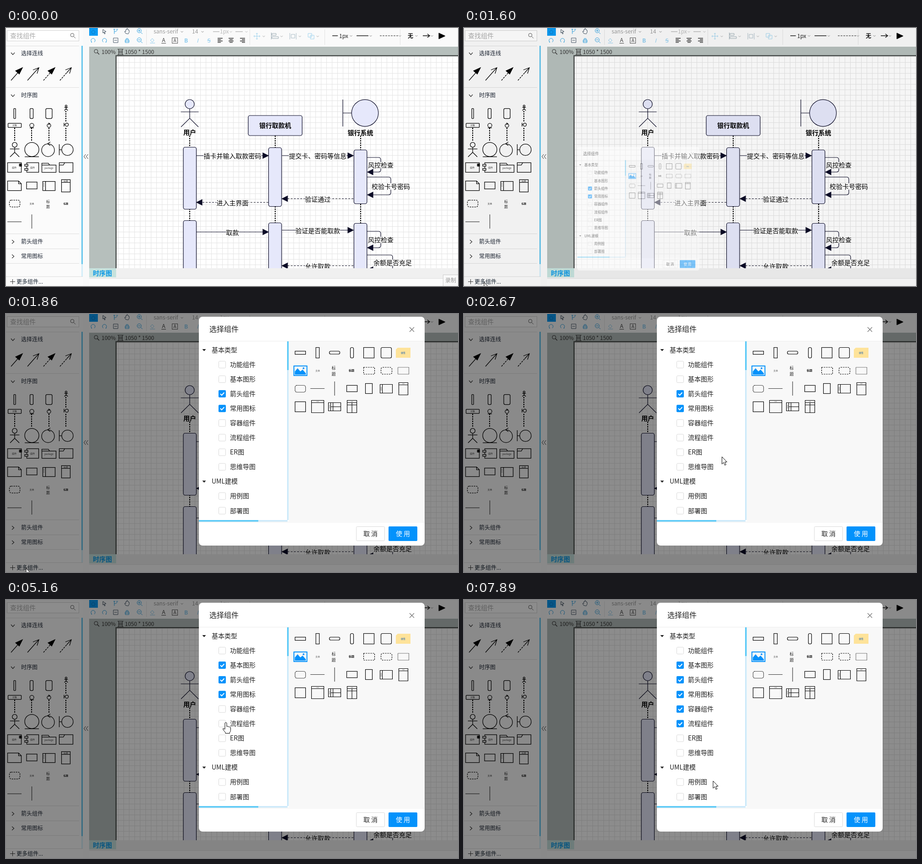
Write an HTML page that moves like this. It is 989 px wide and 566 px high and loops after 8000 ms.

```html
<!DOCTYPE html>
<html lang="zh-CN">
<head>
<meta charset="utf-8">
<style>
html, body { margin: 0; width: 100%; height: 100%; overflow: hidden; background: #fbfbfb; }
svg { display: block; }
text { font-family: "Noto Sans CJK SC", "Noto Sans CJK", "Noto Sans", sans-serif; white-space: pre; }
</style>
</head>
<body>
<svg id="stage" width="989" height="566" viewBox="0 0 989 566" fill="none" stroke="#111"></svg>
<script>
const BLUE = '#0492fb', INK = '#0b0b26', LILAC = '#e6e8fb';

// Markup helpers
const group = (attrs, ...parts) => `<g ${attrs}>${parts.flat().join('')}</g>`;
const path = (d, attrs = '') => `<path d="${d}" ${attrs}/>`;
const rect = (x, y, w, h, r = 0, attrs = '') =>
  `<rect x="${x}" y="${y}" width="${w}" height="${h}" rx="${r}" ${attrs}/>`;
const fillRect = (x, y, w, h, color, r = 0) => rect(x, y, w, h, r, `fill="${color}" stroke="none"`);
const circle = (x, y, r, attrs = '') => `<circle cx="${x}" cy="${y}" r="${r}" ${attrs}/>`;
const text = (x, y, s, size = 14, color = '#222', attrs = '') =>
  `<text x="${x}" y="${y}" font-size="${size}" fill="${color}" stroke="none" ${attrs}>${s}</text>`;
const label = (x, y, s, size, color, attrs = '') =>
  text(x, y, s, size, color, `text-anchor="middle" ${attrs}`);
const bold = 'font-weight="700"';
const dots = (x, y1, y2) => path(`M${x} ${y1}V${y2}`, 'stroke="#000" stroke-width="2" stroke-dasharray="3 2"');
const caret = (x, y, color = '#888') => path(`M${x - 2.5} ${y - 1}l2.5 2.5 2.5-2.5`, `stroke="${color}"`);
const chevron = (x, y, turn) => path('M-4-2L0 2.5 4-2', `transform="translate(${x} ${y}) rotate(${turn})" stroke="#333" stroke-width="1.2"`);
const actor = (x, y, s, fill = 'none') => circle(x, y + 10 * s, 10 * s, `fill="${fill}"`) +
  path(`M${x} ${y + 20 * s}v${21 * s}M${x - 19.5 * s} ${y + 27 * s}h${39 * s}M${x - 19 * s} ${y + 60 * s}L${x} ${y + 41 * s}l${19 * s} ${19 * s}`);

function toolbar() {
  const zoom = (y, plus) => circle(291.5, y, 4.5) + path(`M295 ${y + 3.5}l3.5 3.5M289 ${y}h5` + (plus ? `M291.5 ${y - 2.5}v5` : ''));
  const aligned = (x, a, b) => path(`M${x} 22.5h11M${x + a} 25.5h7M${x} 28.5h11M${x + b} 31.5h7`, 'stroke="#333" stroke-width="1.3"');
  return [
    fillRect(168, 0, 821, 41, '#fafafa'),
    path('M181.5 41V0M307.5 3V37M533.5 3V37M697.5 3V37M862.5 3V37', 'stroke="#e2e2e2"'),
    fillRect(181, 0, 20, 17, '#0b9bf3'),
    path('M187 8l4-3.5 4 3.5-1.5 4.5h-5z', 'stroke="#0878c4"'),
    path('M212 3l7 5-3.5.5 1.5 4-1.5.5-1.5-4-2 2z', 'stroke="#345"'),
    group('stroke="#2a9fe0"',
      path('M237 2v11M237 8q6 0 6-4M235 3h4M241 3h4'),
      path('M188 31a4.5 4.5 0 1 1 5 0M186 30l2 2M213 31a4.5 4.5 0 1 1 5 0M220 30l-2 2'),
      path('M261 26h8v6h-8zM263 26v-3h4v3M260 29h10'),
      zoom(6, true), zoom(26, false)),
    path('M262 12l-2.5-4q0-2 2.5 0V4q1-2 2 0V2q1.5-2 2 0v1q1.5-1 2 1v1q1.5-1 1.5 1v3l-2 4z', 'stroke="#456"'),
    path('M235 22h10v10h-10zM237 27h6', 'stroke="#456"'),
    text(323, 12, 'sans-serif', 12, '#999'), caret(385, 8),
    text(407, 12, '14', 12, '#999'), caret(430, 8),
    path('M453 8h14M502 8h16', 'stroke="#bbb" stroke-width="1.5"'),
    text(468, 12, '1px', 12, '#bbb'), caret(492, 8, '#bbb'), caret(526, 8, '#bbb'),
    path('M316 27l4-4 4 4-4 4zM315 33h11', 'stroke="#8ccbee"'),
    label(345, 31, 'A', 12, '#444'), path('M340 33.5h10', 'stroke="#444"'),
    rect(363.5, 21.5, 12, 12, 0, 'stroke="#555"'), label(369.5, 31, 'A', 10, '#444'),
    label(394, 32, 'B', 12, '#8ccbee', bold), label(419, 32, 'I', 12, '#8ccbee', 'font-style="italic"'),
    label(444, 32, 'S', 12, '#8ccbee', 'text-decoration="line-through"'),
    aligned(463, 0, 0), aligned(487, 2, 2), aligned(512, 4, 4),
    group('stroke="#9fd3ee"',
      path('M549 11v14M542 18h14M547 13l2-2 2 2M547 23l2 2 2-2M544 16l-2 2 2 2M554 16l2 2-2 2'),
      path('M661 12h8v8h-8zM666 16h8v8h-8z')),
    path('M580.5 10v15M582 12h9v4h-9zM582 19h14v4h-14z', 'stroke="#9aaab2"'),
    path('M621 11v14M635 11v14M624 14h8v8h-8z', 'stroke="#a9bcc6"'),
    [564, 603, 643, 682].map(x => caret(x, 18, '#aaa')),
    path('M714 17h12M767 17h26', 'stroke="#222" stroke-width="1.3"'),
    text(729, 22, '1px', 12, '#222'), caret(755, 17), caret(798, 17),
    path('M818 17h40', 'stroke="#222" stroke-dasharray="4 2"'), caret(862, 17),
    text(879, 22, '无', 12, '#111', bold), caret(898, 17),
    path('M912 17h14M922 13l5 4-5 4', 'stroke-width="1.5"'), caret(932, 17),
    path('M947 11l14 6.5-14 6.5z', 'fill="#000"')
  ].flat().join('');
}

function sidebar() {
  const arrow = (x, open, dash) => path(`M${x} 115l15-17`, dash ? 'stroke-dasharray="4 2"' : '') +
    (open ? path(`M${x + 15} 98l10-11M${x + 12} 92l13-5-4 13`) : path(`M${x + 25} 87l-15 7 8 7z`, 'fill="#000"'));
  const tiny = (x, y, s) => label(x, y, s, 5, '#333');
  const title = (y, s, turn) => chevron(15, y - 4, turn) + text(33, y, s, 12, '#1d2533');
  return [
    fillRect(0, 0, 168, 566, '#fbfbfb'),
    rect(2.5, 5.5, 157, 23, 0, 'stroke="#d2d2d2" fill="#fff"'), text(9, 22, '查找组件', 14, '#aaa'),
    circle(145, 15.5, 3.8, 'stroke="#555"'), path('M148 18.5l4 4', 'stroke="#555"'),
    path('M0 39.5H160M0 130.5H160M0 451.5H160M0 484.5H160M0 516.5H160M0 545.5H168', 'stroke="#dedede"'),
    fillRect(165, 39, 3, 506, '#d3edf9'), fillRect(165, 39, 3, 479, '#67c6ec'),
    title(60, '选择连线', 0), title(152, '时序图', 0), title(473, '箭头组件', -90), title(505, '常用图标', -90),
    group('stroke="#000" stroke-width="1.25"',
      arrow(11), arrow(47, true), arrow(82, false, true), arrow(118, true, true),
      rect(17, 176.5, 4, 22, 1), rect(52.5, 176.5, 7, 22, 2), rect(87, 176.5, 14, 22, 3),
      actor(131.5, 169, .2), dots(131, 182, 207),
      rect(4.5, 209, 29, 9, 1), tiny(19, 215, '对象'),
      circle(56.5, 213.5, 4.5), path('M52 219h9'), circle(94, 214, 4), path('M93 208l3 2-3 2'),
      circle(133, 212, 3.5), path('M127 208v8M127 212h3'),
      [19, 56, 94, 131].map(x => dots(x, 219, 247)),
      actor(19, 251, .53), circle(56.5, 266.5, 15.5), path('M41 282.5h31'),
      circle(92, 268, 14), path('M97 250l-6 4 6 4'),
      path('M116.5 255v24M117 267h5'), circle(134.5, 267, 12.5),
      rect(3.5, 295.5, 30, 21), tiny(18, 308, '组件'), path('M30 298h4v5h-4zM28 299h3M28 302h3', 'fill="#000"'),
      rect(45.5, 295.5, 26, 21), path('M41 299h7v4h-7zM41 308h7v4h-7z', 'fill="#fff"'), tiny(58, 308, '组件'),
      path('M78.5 300.5v-4h14l3 4h14v16h-31zM78.5 300.5h17'), tiny(94, 309, 'package'),
      rect(116.5, 295.5, 30, 21), path('M116.5 300.5h9l3-5'),
      path('M3.5 335.5h24l6 6v15h-30zM27.5 335.5v6h6'), rect(45, 338, 23, 15),
      path('M80.5 336.5h27v20h-27zM86.5 336.5v20'), path('M83 340v9', 'stroke="#777" stroke-dasharray="2 1"'),
      path('M121.5 332.5h19v27h-19zM121.5 338.5h19'), tiny(131, 337.5, '标题'),
      rect(7.5, 377.5, 23, 15, 4, 'stroke-dasharray="3 2"'), tiny(56.5, 387, '文本'),
      label(92, 384, '标', 8), label(92, 395, '题', 8), label(131, 387, '标题', 5, '#000', bold),
      path('M3 425h31M56.5 409v31', 'stroke="#444"')),
    path('M14.5 551v11M9 556.5h11', 'stroke="#333"'), text(23, 561, '更多组件...', 12, '#14202e', 'font-weight="500"'),
    fillRect(168, 0, 14, 566, '#f9f9f9'), path('M174.5 277l-4 5 4 5M179.5 277l-4 5 4 5', 'stroke="#333"')
  ].flat().join('');
}

function diagram() {
  const bar = (x, y, h) => rect(x, y + .5, 28.5, h, 4, `fill="${LILAC}"`);
  const head = (x, y, dir) => path(`M${x} ${y}l${-12 * dir}-6v12z`, `fill="${INK}"`);
  const caption = (cx, y, s) => fillRect(cx - s.length * 7, y - 7, s.length * 14, 14, '#fff') + label(cx, y + 5, s, 14, '#000');
  const message = (x1, x2, y, s) => {
    const dir = Math.sign(x2 - x1);
    return path(`M${x1} ${y}H${x2 - dir * 12}`, dir < 0 ? 'stroke-dasharray="4 3"' : '') +
      head(x2, y, dir) + caption((x1 + x2) / 2, y + 1, s);
  };
  const selfCall = (y, right, h, cx, s) =>
    path(`M790 ${y}H${right - 5}q5 0 5 5v${h - 10}q0 5-5 5H803`) + head(791, y + h, -1) + caption(cx, y + h / 2 + 1, s);
  return [
    `<defs><pattern id="grid" x="245" y="63" width="12" height="12" patternUnits="userSpaceOnUse">${path('M.5 0V12M0 .5H12', 'stroke="#e4e4e4"')}</pattern>
    <clipPath id="view"><path d="M182 41H989V527H182z"/></clipPath></defs>`,
    fillRect(182, 41, 807, 486, '#b6bfbc'),
    circle(197, 51, 4, 'stroke="#333"'), path('M200 54l4 4', 'stroke="#333" stroke-width="1.5"'),
    text(209, 57, '100%', 12, '#333'),
    path('M244 46.5h13M244 58.5h13M246.5 46v13M254.5 46v13M247 50h7M247 52.5h7M247 55h7', 'stroke="#333"'),
    text(260, 57, '1050 * 1500', 12, '#333'),
    group('clip-path="url(#view)"',
      fillRect(239, 59, 750, 470, '#8d9492'), fillRect(240, 60, 750, 470, '#484c4b'),
      fillRect(242, 62, 750, 470, '#fff'), fillRect(242, 62, 750, 470, 'url(#grid)'),
      group(`stroke="${INK}" stroke-width="1.2"`,
        dots(402, 236, 430), dots(589, 236, 430), dots(776, 236, 430),
        actor(402, 157, 1, LILAC), label(402, 234, '用户', 14, '#000', bold),
        rect(530, 192, 118, 44, 4, `fill="${LILAC}"`), label(589, 219, '银行取款机', 14, '#000', bold),
        path('M737 157v59M737 186.5h19'), circle(785.5, 186.5, 29.3, `fill="${LILAC}"`),
        label(775.5, 235, '银行系统', 14, '#000', bold),
        bar(388, 261, 136), bar(388, 422, 140), bar(574.5, 262, 129), bar(574.5, 427, 140), bar(761.3, 267, 118), bar(761.3, 428, 140),
        message(417, 574, 280, '插卡并输入取款密码'), message(604, 760, 280, '提交卡、密码等信息'),
        selfCall(284, 820, 32, 820, '风控检查'), selfCall(327, 842, 39, 842, '校验卡号密码'),
        message(760, 604, 374.5, '验证通过'), message(574, 417, 382.5, '进入主界面'),
        message(417, 574, 447.5, '取款'), message(604, 760, 443.5, '验证是否能取款'),
        selfCall(446, 820, 36, 820, '风控检查'), selfCall(498, 846, 32, 846, '余额是否充足'),
        message(760, 604, 521.5, '允许取款'))),
    fillRect(182, 527, 807, 22, '#f0f0f0'), fillRect(182, 527, 59, 20, '#c6e2dd'),
    text(190, 543, '时序图', 14, '#0a98e6', bold),
    path('M181 549.5H989', 'stroke="#e0e0e0"')
  ].flat().join('');
}

const TREE = ['功能组件', '基本图形', '箭头组件', '常用图标', '容器组件', '流程组件', 'ER图', '思维导图', '', '用例图', '部署图'];
const rowY = i => 111 + i * 32.05;

function dialog() {
  const folder = (y, s) => path(`M429.5 ${y - 2}h8l-4 4.5z`, 'fill="#222" stroke="none"') + text(450, y + 5, s);
  const dashed = (x, r, dash) => rect(x, 117, 24, 15, r, `stroke-dasharray="${dash}"`);
  return [
    fillRect(422, 6, 494, 502, '#fff', 8), fillRect(619, 60, 297, 395, '#f8f8f8'),
    path('M422 59.5H916M422 456.5H916', 'stroke="#ececec"'),
    text(445, 39, '选择组件', 16), path('M883 29l10 10M893 29l-10 10', 'stroke="#777" stroke-width="1.3"'),
    fillRect(615, 60, 3.5, 392, '#cdeafa'), fillRect(615, 60, 3.5, 63, '#5fcbf7'),
    fillRect(422, 452, 194, 3.5, '#cdeafa'), fillRect(422, 452, 130, 3.5, '#5fcbf7'),
    folder(79, '基本类型'), folder(rowY(8), 'UML建模'),
    TREE.map((s, i) => text(490, rowY(i) + 5, s)),
    '<g id="boxes"></g>',
    group('stroke="#000" stroke-width="1.15"',
      rect(632.5, 81.5, 23, 7), rect(678, 73.5, 7.5, 23), rect(707.5, 81.5, 23, 6.5, 3), rect(753.5, 73.5, 7, 23, 3),
      rect(782.5, 73.5, 23, 23), rect(820.5, 73.5, 23, 23, 3),
      path('M853 78l4-4h28v22h-32z', 'fill="#fee39a" stroke="none"'), label(869, 87, '便签', 5, '#2468b0'),
      rect(630, 114, 28.5, 21, 0, `stroke="${BLUE}" stroke-width="2"`),
      path('M632 133v-7l6-7 6 7 5-4 7 8v3z', `fill="${BLUE}" stroke="none"`), circle(651, 119, 2, `fill="${BLUE}" stroke="none"`),
      label(682, 126, '文本', 5, '#555'), label(717, 122, '标', 9), label(717, 135, '题', 9), label(756, 126, '标题', 6, '#111', bold),
      dashed(782.5, 0, '3 2'), dashed(820.5, 4, '3 2'), dashed(857.5, 0, '1 1'),
      rect(632.5, 156.5, 23, 15, 4, 'stroke-dasharray="2 1"'),
      path('M666 163.5h31M719 148v31', 'stroke="#333"'),
      rect(745.5, 156.5, 23, 14), rect(786.5, 152.5, 15, 22),
      path('M818.5 154.5h27v19h-27zM823.5 154.5v19M859.5 150.5h20v27h-20zM859.5 155.5h20'),
      rect(632.5, 192.5, 23, 22),
      path('M668.5 189.5h27v27h-27zM668.5 194.5h27M705.5 194.5h27v18h-27zM710.5 194.5v18M715.5 194.5v18M710.5 203.5h22M746.5 189.5h21v27h-21zM746.5 194.5h21M746.5 199.5h21M757 194.5v22'),
      path('M867 153h5M679 192h6M708 199v8M821 160v8M754 192h6', 'stroke="#888"')),
    rect(766.5, 466.5, 62, 31, 2, 'stroke="#d9d9d9"'), label(797.5, 487, '取 消', 14),
    fillRect(837, 466, 63, 32, BLUE, 2), label(868.5, 487, '使 用', 14, '#fff')
  ].flat().join('');
}

// Row -> step from which it is ticked
const TICKED = { 1: 29, 2: 0, 3: 0, 4: 48, 5: 41 };
const boxes = step => TREE.map((s, i) => {
  if (!s) return '';
  const y = rowY(i) - 7.5;
  if (step >= TICKED[i]) return fillRect(465, y - .5, 16, 16, BLUE, 2) + path(`M469 ${y + 7.5}l3 3.2 5.5-6`, 'stroke="#fff" stroke-width="2"');
  const pressed = step === TICKED[i] - 1, hover = i === 1 && step > 24;
  return rect(465.5, y, 15, 15, 2, `fill="${pressed ? '#a5d8ff' : '#fff'}" stroke="${pressed || hover ? BLUE : '#d9d9d9'}"`);
}).join('');

const ARROW = 'M0 0V16l3.7-3.5 2.5 6 2.7-1.2-2.5-5.8H11z';
const HAND = 'M-2 1.5Q0-1.5 2 1.5V9q2-1.5 3.5.5 2-1 3 1 2-.5 2 2V17q0 3-2 5v2H-1v-2q-3-3-5.5-7.5 0-2.5 4.5.5z';
// Pointer path: step, x, y
const TRACK = [[1, 778, 520], [4, 480, 427], [8, 73, 545], [10, 44, 558], [14, 44, 558], [15, 99, 545], [16, 463, 449],
  [18, 614, 410], [23, 490, 168], [25, 474, 139], [27, 475, 142], [28, 477, 165], [29, 507, 230], [30, 484, 285],
  [33, 482, 300], [36, 480, 269], [42, 482, 268], [45, 479, 244], [48, 477, 236], [50, 478, 260], [52, 478, 340],
  [57, 784, 445], [59, 633, 417], [60, 545, 397]];
const isHand = s => s > 24 && s < 28 || s > 35 && s < 51;

function pointerAt(step) {
  const i = Math.max(1, TRACK.findIndex(k => k[0] >= step));
  const [a, x1, y1] = TRACK[i - 1], [b, x2, y2] = TRACK[i], p = (step - a) / (b - a);
  return [x1 + (x2 - x1) * p, y1 + (y2 - y1) * p];
}

// Dialog opening: scale, opacity, mask
const OPENING = [[.2, 0, .01], [.54, .5, .04], [.966, .965, .34], [1, 1, .45]];

const $ = id => document.getElementById(id);
$('stage').innerHTML = diagram() + toolbar() + sidebar() +
  group('id="record"', rect(956.5, 541.5, 40, 30, 0, 'fill="#f9f9f9" stroke="#ccc"'), text(961, 558, '录制', 12, '#999')) +
  '<rect id="mask" width="989" height="566" fill="#000" stroke="none"/>' +
  group('id="dialog"', dialog()) + path('', 'id="pointer" fill="#fff" stroke="#000" stroke-linejoin="round"');

function draw(step) {
  const [scale, opacity, shade] = step < 11 ? [.2, 0, 0] : OPENING[Math.min(step - 11, 3)];
  $('record').setAttribute('opacity', step ? 0 : 1);
  $('mask').setAttribute('opacity', shade);
  $('dialog').setAttribute('opacity', opacity);
  $('dialog').setAttribute('transform', `translate(44 560) scale(${scale}) translate(-44 -560)`);
  $('boxes').innerHTML = boxes(step);
  $('pointer').setAttribute('opacity', step ? 1 : 0);
  $('pointer').setAttribute('d', isHand(step) ? HAND : ARROW);
  $('pointer').setAttribute('transform', `translate(${pointerAt(Math.max(1, step))})`);
}

let shown = -1;
function tick() {
  const step = Math.min(60, Math.max(0, Math.floor((performance.now() % 8000 - 17) / 131.2)));
  if (step !== shown) draw(shown = step);
  requestAnimationFrame(tick);
}
tick();
</script>
</body>
</html>
```
